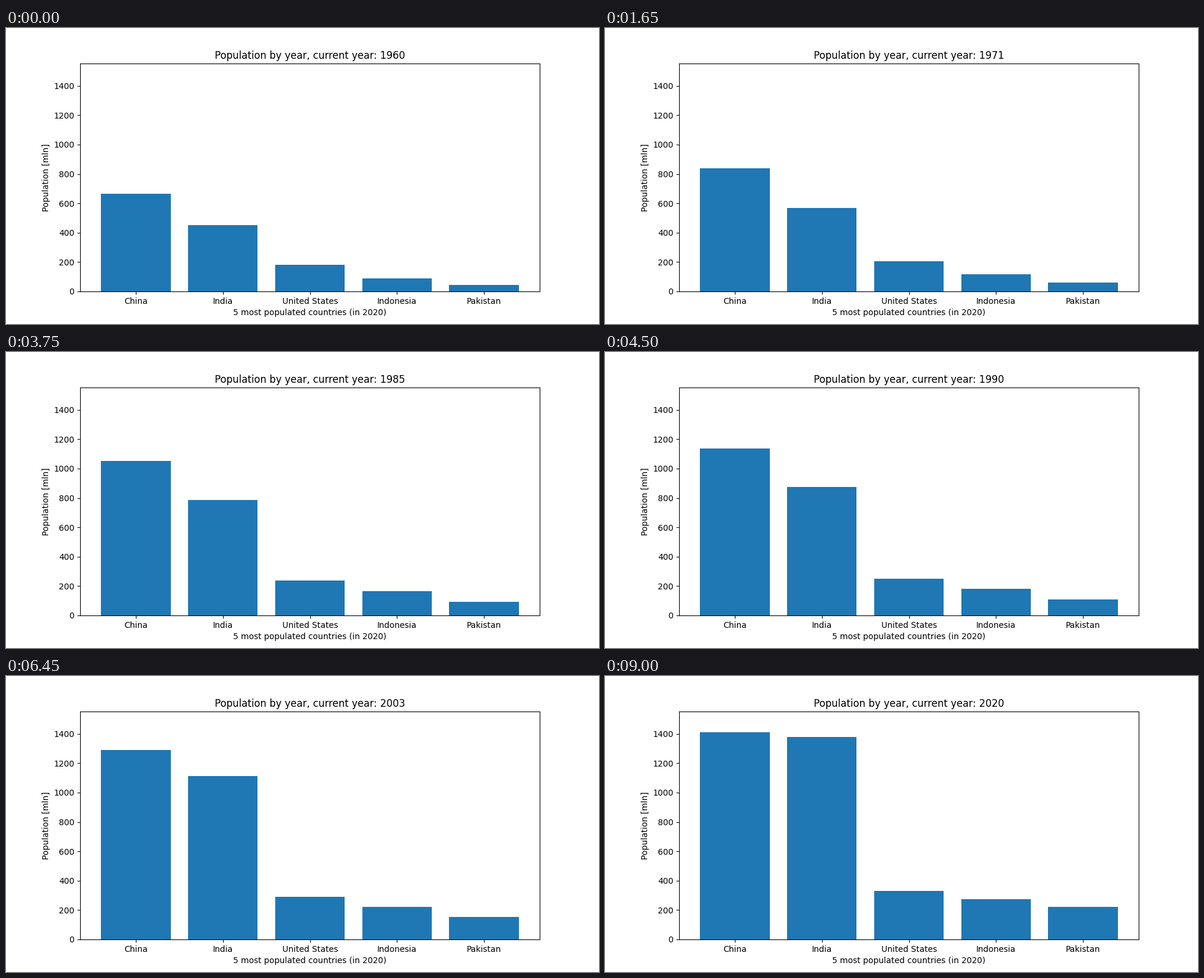
A matplotlib script for the animation above (9150 ms loop, 1000 by 500 pixels).

```python
import numpy as np
import matplotlib.pyplot as plt
from matplotlib.animation import FuncAnimation

years = np.arange(1960, 2021)
EVEN = np.linspace(years[0], years[-1], 5)

# A few key points per country: (years, population in millions).
KEYS = {
    "China": ([1960, 1962, 1966, 1975, 1980, 1985, 1990, 2000, 2010, 2020],
              [667, 666, 735, 916, 981, 1051, 1135, 1263, 1338, 1411]),
    "India": (EVEN, [450.5, 623, 873, 1148, 1380]),
    "United States": (EVEN, [181, 216, 250, 295.5, 331]),
    "Indonesia": (EVEN, [88, 131, 181, 226, 273.5]),
    "Pakistan": (EVEN, [45, 67, 107.5, 160, 221]),
}


def smooth(x, knots, values):
    """Cubic Hermite curve through the key points, evaluated at x."""
    k, v = np.asarray(knots, float), np.asarray(values, float)
    slope = np.gradient(v, k, edge_order=2)
    i = np.clip(np.searchsorted(k, x, side="right") - 1, 0, len(k) - 2)
    h = k[i + 1] - k[i]
    t = (x - k[i]) / h
    return ((1 + 2 * t) * (1 - t) ** 2 * v[i]
            + t * (1 - t) ** 2 * h * slope[i]
            + t ** 2 * (3 - 2 * t) * v[i + 1]
            + t ** 2 * (t - 1) * h * slope[i + 1])


heights = np.array([smooth(years, *keys) for keys in KEYS.values()])

fig, ax = plt.subplots(figsize=(10, 5), dpi=100)
bars = ax.bar(list(KEYS), heights[:, 0])
ax.set_ylim(0, heights.max() * 1.1)
ax.set_xlabel("5 most populated countries (in 2020)")
ax.set_ylabel("Population [mln]")
title = ax.set_title("")


def update(frame):
    for bar, height in zip(bars, heights[:, frame]):
        bar.set_height(height)
    title.set_text(f"Population by year, current year: {years[frame]}")
    return [*bars, title]


anim = FuncAnimation(fig, update, frames=len(years), interval=150,
                     repeat=True, repeat_delay=0)
plt.show()
```
